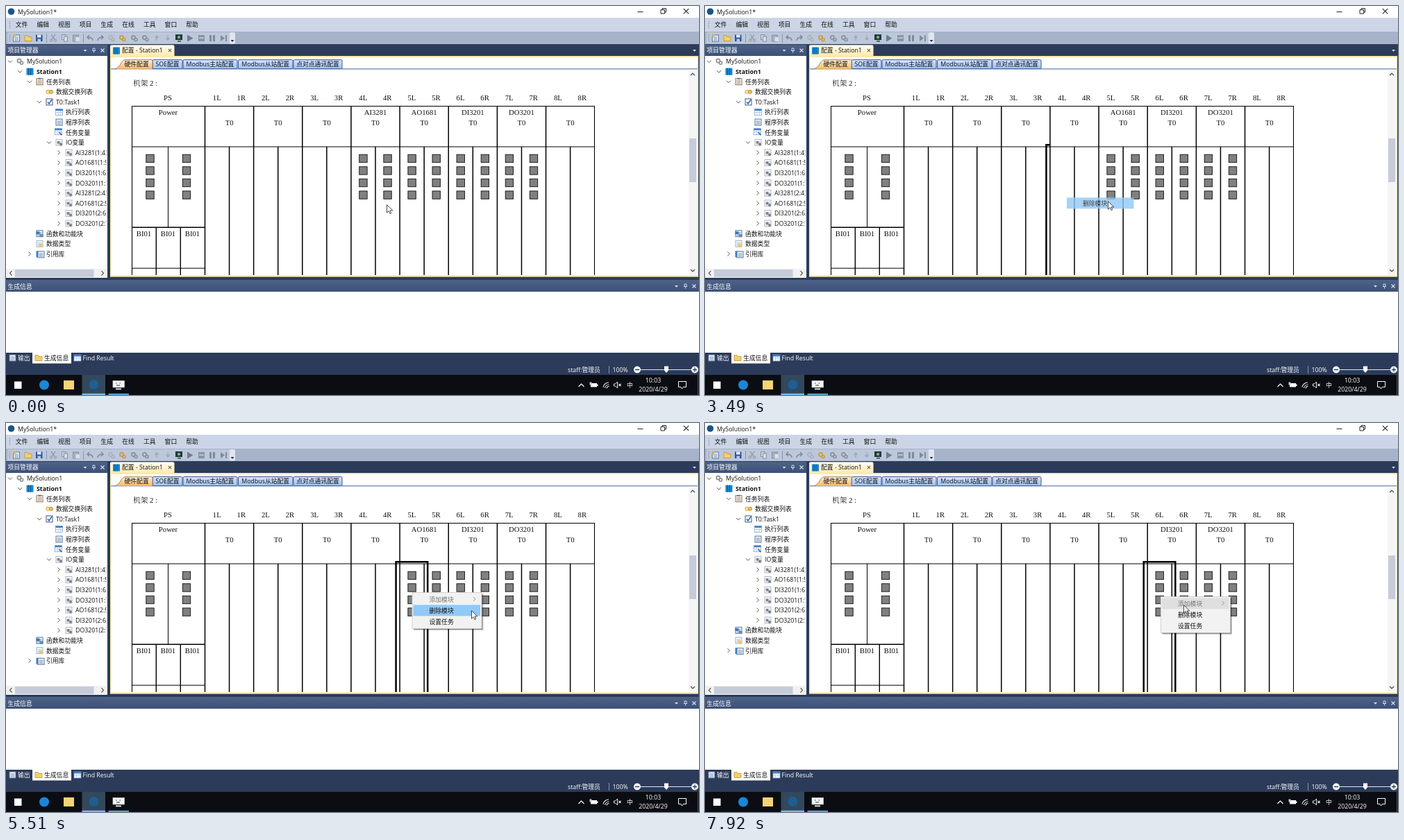
These frames come from a looping animation (998 px wide and 561 px high, 8000 ms). An HTML page:

```html
<!DOCTYPE html>
<html lang="zh">
<head>
<meta charset="utf-8">
<style>
html, body { margin: 0; width: 100%; height: 100%; overflow: hidden; background: #fff }
svg { display: block; width: 998px; height: 561px; font: 8.8px 'Open Sans', 'Noto Sans CJK SC', 'Noto Sans CJK', sans-serif; white-space: pre }
.rack { font: 10.7px 'Liberation Serif', 'Noto Serif CJK SC', 'Noto Sans CJK SC', serif; text-anchor: middle }
</style>
</head>
<body>
<svg viewBox="0 0 998 561">
<defs>
<linearGradient id="head" x2="0" y2="1"><stop stop-color="#4f6388"/><stop offset="1" stop-color="#3c5078"/></linearGradient>
<linearGradient id="tab" x2="0" y2="1"><stop stop-color="#fffdf4"/><stop offset="1" stop-color="#ffe9a9"/></linearGradient>
<linearGradient id="hot" x2="0" y2="1"><stop stop-color="#fff0da"/><stop offset="1" stop-color="#fbb963"/></linearGradient>
<linearGradient id="cool" x2="0" y2="1"><stop stop-color="#d3e4fb"/><stop offset="1" stop-color="#a0c2f0"/></linearGradient>
<clipPath id="side"><rect y="72" width="144.5" height="306"/></clipPath>
</defs>
<g id="base"></g><g id="live"></g>
</svg>
<script>
const rect = (x, y, w, h, fill, more = '') => `<rect x="${x}" y="${y}" width="${w}" height="${h}" fill="${fill}" ${more}/>`;
const path = (d, stroke = '#000', width = 1, fill = 'none', more = '') => `<path d="${d}" stroke="${stroke}" stroke-width="${width}" fill="${fill}" ${more}/>`;
const dot = (x, y, r, fill, more = '') => `<circle cx="${x}" cy="${y}" r="${r}" fill="${fill}" ${more}/>`;
const text = (x, y, s, fill = '#111', more = '') => `<text x="${x}" y="${y}" fill="${fill}" ${more}>${s}</text>`;
const range = (n, f) => Array.from({ length: n }, (_, i) => f(i)).join('');

// Small icons, centred on x, y
const sheet = (x, y, c = '#54749c') => rect(x - 4.5, y - 4.5, 9, 9, '#f8fbff', `stroke="${c}"`) +
  path(`M${x - 3} ${y - 1.5}h6m-6 2h6m-6 2h6`, c, .8);
const clip = (x, y) => sheet(x, y, '#936f4d') + rect(x - 2, y - 5.5, 4, 2, '#6d7078');
const grid = (x, y) => rect(x - 5, y - 4.5, 10, 9, '#fff', 'stroke="#7fa3d0" stroke-width=".8"') +
  rect(x - 5, y - 4.5, 10, 2.5, '#3f7fcb') + path(`M${x - 5} ${y + .5}h10m-6.5-2.5v6.5m3.5 0v-6.5`, '#a9c3e4', .8);
const folder = (x, y) => path(`M${x - 5} ${y + 4}v-8h4l1 2h5v6z`, '#b58a2c', .7, '#f6cf68');
const gears = (x, y, c = '#8b8f98') => dot(x - 1.5, y - 1, 2.6, 'none', `stroke="${c}" stroke-width="1.7"`) +
  dot(x + 2, y + 2, 2.1, 'none', `stroke="${c}" stroke-width="1.5"`);
const station = (x, y) => rect(x - 5, y - 5, 10, 10, '#1686cf') + path(`M${x - 2} ${y - 5}v10m3-10v10`, '#105a98', 1);
const check = (x, y) => rect(x - 4.5, y - 4.5, 9, 9, '#fff', 'stroke="#43557a"') + path(`M${x - 2.5} ${y}l2 2.5 4-6`, '#2167c5', 1.6);
const swap = (x, y) => dot(x - 2, y, 2.7, '#ffe3a0', 'stroke="#d7a43a"') + dot(x + 2.5, y, 2.5, '#f2c75f', 'stroke="#b9842a"');
const wrench = (x, y) => grid(x - 1, y - 1) + path(`M${x} ${y}l4 4`, '#496a9a', 1.8);
const blocks = (x, y) => sheet(x, y) + rect(x - 5, y - 3, 5, 4, '#3479bd') + rect(x, y + 1, 5, 4, '#6f88a8');
const types = (x, y) => sheet(x, y, '#9ab4d3') + rect(x - 1, y, 5, 4, '#f1c65a');
const io = (x, y) => sheet(x, y, '#b4b7be') + dot(x - 1, y, 2, '#7b808c') + dot(x + 2.5, y + 2.5, 2, '#7b808c');
const book = (x, y) => rect(x - 5, y - 4, 4, 9, '#3480c8') + rect(x - 1, y - 4, 3, 9, '#d78c45') + sheet(x + 2, y + 1);
const cross = (x, y, c, r = 2.5) => path(`M${x - r} ${y - r}l${2 * r} ${2 * r}m0 ${-2 * r}l${-2 * r} ${2 * r}`, c, 1.1);
const down = (x, y, c) => path(`M${x - 2.5} ${y - 1}h5l-2.5 2.8z`, 'none', 0, c);
const pin = (x, y) => path(`M${x - 1.5} ${y + .5}v-3.5h3v3.5m-4 0h5m-2.5 0v3`, '#dce4f1', .9);
const chevron = (x, y, open, c = '#555') => path(open ? `M${x - 3} ${y - 1.5}l3 3 3-3` : `M${x - 1.5} ${y - 3}l3 3-3 3`, c, 1);

// Rack geometry
const COL = 70.15, LEFT = 286.5, FLOOR = 388;
const names = { 3: 'AI3281', 4: 'AO1681', 5: 'DI3201', 6: 'DO3201' };
const lamps = x => range(4, i => rect(x - 5.7, 214.2 + 17.55 * i, 11.4, 11.4, '#808080', 'stroke="#111" stroke-width=".9"'));

function windowFrame() {
  const menus = ['文件', '编辑', '视图', '项目', '生成', '在线', '工具', '窗口', '帮助'];
  const grey = '#8792a5';
  return rect(0, 0, 998, 561, '#2b3b59') + rect(0, 0, 998, 17, '#fff') +
    dot(7.5, 8, 4.8, '#1c5485') + text(17, 11.5, 'MySolution1*') +
    path('M909.5 8.5h8M943 5.5h5.5v5.5h-5.5zM945 5.5v-2h5.5v5.5h-2', '#222') + cross(979.5, 7.5, '#222', 3.7) +
    rect(0, 17, 998, 20, '#cbd5e6') + rect(0, 37, 998, 18, '#a6b3c9') + rect(2, 38, 328, 16.5, '#bcc8da', 'rx="2"') +
    rect(322, 38, 8, 16.5, '#dfe6f0', 'rx="2"') +
    path('M5.5 22v10M5.5 41v10', '#77859d', 1.2, 'none', 'stroke-dasharray="1.2 1.8"') +
    menus.map((s, i) => text(13.7 + 30.7 * i, 30.3, s)).join('') +
    sheet(15, 46.5) + dot(12, 43, 2, '#efb33a') + folder(32, 46.5) +
    rect(43, 41.5, 9.5, 9.5, '#2d55a5') + rect(45, 41.5, 5.5, 4, '#e8effa') + rect(45.5, 47.5, 4.5, 3.5, '#b7c9e8') +
    path('M58.5 40v13M111.5 40v13', '#8895ad') +
    path('M65 41l5 7m1-7l-5 7', grey, 1.2) + dot(65, 49.5, 1.7, 'none', `stroke="${grey}"`) + dot(71, 49.5, 1.7, 'none', `stroke="${grey}"`) +
    rect(80.5, 41.5, 5.5, 7, '#cfd6e1', `stroke="${grey}"`) + rect(83.5, 44, 5, 7, '#d5dce7', `stroke="${grey}"`) +
    rect(96.5, 42, 8, 9, '#a6b0c1', `stroke="${grey}"`) + rect(100.5, 45, 5, 6, '#dbe1ea') +
    path('M125 50q0-5-8-5m3-3l-3 3 3 3M132 50q0-5 8-5m-3-3l3 3-3 3', '#7b879c', 1.5) +
    gears(152, 46.5, '#a9b1bd') + gears(168, 46.5, '#d09a38') + gears(185, 46.5) + gears(201, 46.5) +
    path('M217 50v-7m-2.5 3l2.5-3 2.5 3M233 42v7m-2.5-3l2.5 3 2.5-3', '#9aa5b6', 1.3) +
    rect(244.5, 41.5, 9, 7, '#1d3c48', 'stroke="#26323c"') + dot(249, 45, 2, '#7ec35c') + rect(247, 50, 5, 1.5, '#344') +
    path('M261 41.5v10l8.5-5z', 'none', 0, '#6f7d92') + rect(277, 42, 9, 9, '#8793a6') + rect(278, 45, 7, 2, '#b8c3d2') +
    rect(293, 42, 3, 9, '#7f8ba0') + rect(298, 42, 3, 9, '#7f8ba0') +
    path('M309 42v9l6-4.5zM316 42h2v9h-2z', 'none', 0, '#7f8ba0') + down(326, 50, '#222');
}

function panels() {
  const tabs = [['SOE配置', 211, 43], ['Modbus主站配置', 255, 78], ['Modbus从站配置', 334.5, 78.5], ['点对点通讯配置', 414, 70]];
  const thumb = '#c5cbd9', mark = '#dce4f1';
  return rect(0, 56, 146, 16, 'url(#head)') + text(2.5, 67.3, '项目管理器', '#fff') +
    down(114, 64, mark) + pin(126.5, 64) + cross(139, 64, mark) +
    rect(0, 72, 146, 320, '#fff') + rect(0, 379, 146, 12.5, '#f1f1f1') + rect(13, 380, 113.5, 11, thumb) +
    path('M8.5 382l-3 3.3 3 3.3M137.5 382l3 3.3-3 3.3', '#444', 1.1) +
    rect(150, 72, 847, 318.7, '#ffe9a9') + rect(151.2, 74, 844.8, 314.5, '#fff') +
    path('M150 73V58.3q0-2 2-2h88.500q2 0 2 2v14.7z', 'none', 0, 'url(#tab)') + station(159, 64.5) +
    text(167, 67.3, '配置 - Station1') + cross(236, 64, '#6b6350', 2.2) + down(991.5, 64, mark) +
    tabs.map(([s, x, w]) => rect(x, 77.5, w, 13, 'url(#cool)', 'rx="1.5" stroke="#2d4b83" stroke-width=".9"') +
      text(x + w / 2, 87, s, '#111', 'text-anchor="middle"')).join('') +
    path('M151 90.8h845', '#43639a') +
    path('M157 90.8q4-1 7-5.5 4-8 9-8h36q2 0 2 2v11.5', '#8a6a3c', .8, 'url(#hot)') + text(170.5, 87, '硬件配置') +
    rect(983, 93, 12.5, 295, '#f5f5f5') + rect(984, 191, 10, 63, thumb) +
    path('M986 100l3-3 3 3M986 380l3 3 3-3', '#444', 1.2) +
    rect(0, 395, 998, 17, 'url(#head)') + text(2.5, 407.5, '生成信息', '#fff') +
    down(965.5, 404, mark) + pin(978.5, 404) + cross(991, 404, mark) +
    rect(0, 412, 998, 88, '#fff') + rect(38, 500, 56, 15.5, '#fff') +
    sheet(9.5, 507.5) + text(17, 511, '输出', '#fff') + folder(47, 507.5) + text(55, 511, '生成信息') +
    grid(103, 507.5) + text(110.5, 511, 'Find Result', '#fff') +
    text(809, 528, 'staff:管理员', '#fff') + path('M868.5 519v11', '#8794ab') + text(873.5, 528, '100%', '#fff') +
    path('M914 524.5h73', '#dfe5ee') + dot(909, 524.5, 5, '#f4f6f9') + dot(992, 524.5, 5, '#f4f6f9') +
    path('M906 524.5h6M989 524.5h6m-3-3v6', '#31425f', 1.3) + path('M948 519.5h6v6l-3 3.5-3-3.5z', 'none', 0, '#fff');
}

function taskbar() {
  const mid = 'text-anchor="middle"';
  return rect(0, 532, 998, 29, '#0b0d12') + rect(12, 541.5, 10.5, 10.5, '#fff') + dot(55, 546.5, 7, '#1b86d8') +
    rect(83, 540, 15, 13, '#f7d474') + rect(109.5, 532, 33.5, 29, '#33485c') + dot(126.5, 546, 7, '#1d5f92') +
    rect(109.5, 558.8, 33.5, 2.2, '#76b9ed') + rect(147.5, 558.8, 29.5, 2.2, '#4f9fce') +
    rect(154, 540.5, 16.5, 9.5, '#f4f4f4', 'stroke="#bfc5ca" stroke-width=".8"') + path('M158 544h1.5m4 0h1.5m-6 3h5', '#333') +
    rect(158, 551.5, 8, 1.8, '#e6e6e6') +
    path('M824.5 549l4-4 4 4', '#fff', 1.2) + rect(842, 544, 9, 5.5, '#fff') + rect(851, 545.5, 1.5, 2.5, '#fff') + rect(840.5, 542.5, 3, 4, '#ccc') +
    path('M860 550a8 8 0 0 1 8-7M862.5 551a6 6 0 0 1 6-5M865 551.5a3.5 3.5 0 0 1 3.5-3', '#e6e6e6', 1.1) +
    path('M875.5 545h2l3-3v9l-3-3h-2z', '#fff', .9) + cross(884, 546.5, '#fff', 1.6) + text(894, 550, '中', '#fff') +
    text(932, 543, '10:03', '#fff', mid) + text(932, 556, '2020/4/29', '#fff', mid) +
    path('M968.5 541.5h11v8h-4l-2 2.5-1.5-2.5h-3.5z', '#fff') + path('M996.5 532v29', '#555');
}

function rack() {
  let s = text(200.5, 114.5, '机架 2 :') + text(233, 136, 'PS') + text(233.5, 157, 'Power') + lamps(207.5) + lamps(260);
  s += path('M181.5 144.5H847.5M181.5 203H847.5M233.5 203V319M181.5 378.2H286.5', '#000') +
    path('M181.5 319.3H286.5', '#000', 1.6) + path(`M181.5 144V${FLOOR}M847.5 144V${FLOOR}`, '#000', 1.1);
  s += range(3, i => text(198.5 + 35 * i, 332, 'BI01')) + path(`M216.3 319V${FLOOR}M251.3 319V${FLOOR}`, '#000', 1.4);
  s += range(8, i => {
    const x = LEFT + COL * i;
    return path(`M${x} 144V${FLOOR}M${x + COL / 2} 203V${FLOOR}`, '#000', 1.5) + text(x + COL / 2, 171.5, 'T0') +
      text(x + 17.3, 136, i + 1 + 'L') + text(x + 52.3, 136, i + 1 + 'R');
  });
  return `<g class="rack">${s}</g>`;
}

// Rows: depth, label, icon, expander (1 open, 0 closed)
function tree(gone) {
  const modules = [1, 2].flatMap(r => Object.values(names).map((n, i) => `${n}(${r}:${i + 4})`));
  modules.splice(4, gone);
  const rows = [[0, 'MySolution1', gears, 1], [1, 'Station1', station, 1], [2, '任务列表', clip, 1], [3, '数据交换列表', swap],
    [3, 'T0:Task1', check, 1], [4, '执行列表', grid], [4, '程序列表', sheet], [4, '任务变量', wrench], [4, 'IO变量', io, 1],
    ...modules.map(m => [5, m, io, 0]), [2, '函数和功能块', blocks], [2, '数据类型', types], [2, '引用库', book, 0]];
  return `<g clip-path="url(#side)">` + rows.map(([depth, label, icon, open], i) => {
    const x = 30 + 14 * depth, y = 80 + 14.6 * i;
    return (open === undefined ? '' : chevron(x - 24, y, open)) + icon(x - 9.5, y) +
      text(x, y + 3.3, label, '#111', depth === 1 ? 'font-weight="700"' : '');
  }).join('') + '</g>';
}

function selection(col, partial) {
  const x = LEFT + COL * col - 5.5;
  return path(partial ? `M${x} ${FLOOR}V200.2h5.5` : `M${x} ${FLOOR}V200.2h45.6V${FLOOR}`, '#000', 2.5);
}

// Menus: fade-in, full, close, x, y
const popups = [[1170, 1250, 3490, 519, 258], [4880, 4980, 6450, 584.5, 244], [7690, 7770, 9e9, 656, 250]];
const FADE = 77;
function popup(t, px, py) {
  return popups.map(([start, full, close, x, y]) => {
    if (t < start || t >= close + 2 * FADE) return '';
    const band = fill => rect(x + 2, y + 18.3, 96.5, 16, fill);
    const remove = text(x + 25, y + 29.7, '删除模块');
    if (t >= close) return `<g opacity="${t < close + FADE ? .8 : .35}">${band('#91c9f7')}${remove}</g>`;
    const hover = px > x + 2 ? Math.floor((py - y - 2) / 16) : -1;
    return `<g opacity="${t < full ? .72 : 1}">` + rect(x + 3, y + 3, 100, 52, '#000', 'opacity=".2"') +
      rect(x + 2, y + 2, 100, 52, '#000', 'opacity=".3"') +
      rect(x + .5, y + .5, 100, 52, '#f2f2f2', 'stroke="#c8c8c8" stroke-width=".8"') +
      (hover === 0 ? rect(x + 2, y + 2.3, 96.5, 16, '#dfdfdf') : '') + (hover === 1 ? band('#91c9f7') : '') +
      text(x + 25, y + 13.7, '添加模块', '#777') + chevron(x + 90, y + 10, 0, '#999') + remove + text(x + 25, y + 45.7, '设置任务') + '</g>';
  }).join('');
}

// Pointer moves: first step, last step, step count, target
const moves = [[470, 850, 6, 519, 258], [2170, 2480, 5, 580, 281], [3566, 3870, 5, 568, 257], [4040, 4344, 5, 585, 244],
  [5200, 5510, 5, 670, 270], [6527, 6910, 6, 660, 254], [7170, 7240, 2, 656, 250], [7920, 7920, 1, 689, 262]];
function pointer(t) {
  let x = 548, y = 286;
  for (const [from, to, n, tx, ty] of moves) {
    if (t < from) break;
    const gap = (to - from) / (n - 1) || 1;
    const k = Math.min(n, Math.floor((t - from) / gap + 1e-6) + 1) / n;
    x += (tx - x) * k;
    y += (ty - y) * k;
  }
  return [x, y];
}

function scene(t) {
  const [px, py] = pointer(t);
  const since = (a, b) => (t >= a) + (t >= b);
  const gone = since(3490, 6450);
  const modules = Object.entries(names).slice(gone).map(([col, name]) => {
    const x = LEFT + COL * col;
    return text(x + COL / 2, 157, name) + lamps(x + 17.5) + lamps(x + 52.6);
  }).join('');
  const partial = [3490, 6450].some(c => t >= c && t < c + FADE);
  return tree(since(3490 + FADE, 6450 + FADE)) + `<g class="rack">${modules}</g>` +
    (t < 1090 ? '' : selection(3 + since(4420, 7310), partial)) + popup(t, px, py) +
    `<g transform="translate(${px} ${py})">` +
    path('M.5 .7V12.2L3.2 9.6 5 13.6 6.8 12.8 5.1 8.9H8.8z', '#111', .75, '#fff') + '</g>';
}

base.innerHTML = windowFrame() + panels() + taskbar() + rack();
let last;
function draw() {
  const next = scene(performance.now() % 8000);
  if (next !== last) live.innerHTML = last = next;
  requestAnimationFrame(draw);
}
draw();
</script>
</body>
</html>
```
